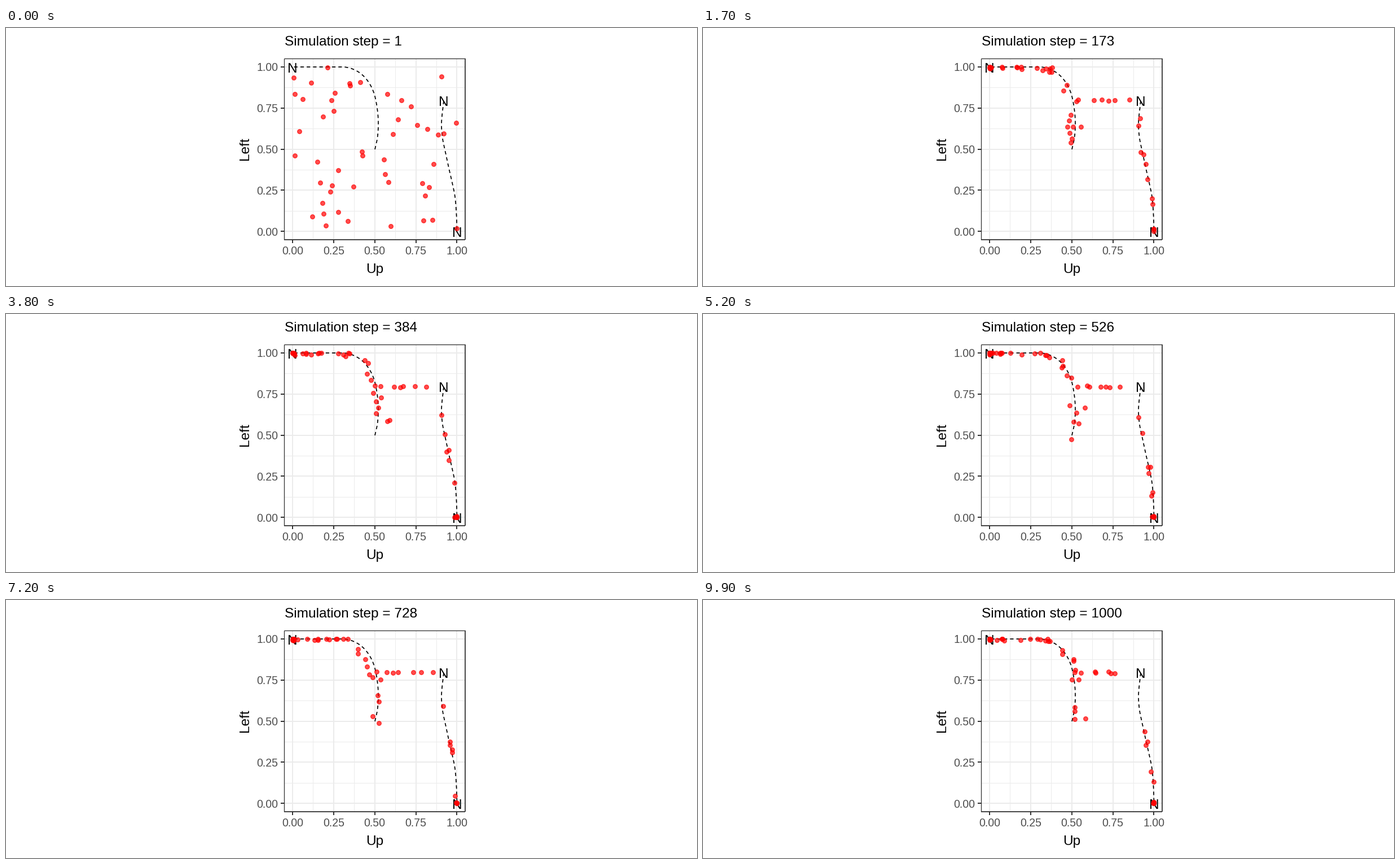
These frames come from a looping animation (1225 px wide and 457 px high, 10 s). A matplotlib script:

```python
import numpy as np
import matplotlib.pyplot as plt
from matplotlib.animation import FuncAnimation

W, H, DPI = 1225, 457, 64
FRAMES, INTERVAL = 100, 100
PT = 72 / DPI                      # points per pixel
X0, Y0, UNIT = 508, 360.3, 291.4   # plot origin and length of one unit
TEXT, LABEL = 24.4, 19.5

plt.rcParams["font.family"] = "Liberation Sans"

# Starting places of the dots, in pixels
START = np.array([
    (510, 88), (512, 117), (526, 126), (541, 97), (570, 70), (609, 98),
    (610, 102), (628, 96), (583, 115), (577, 128), (581, 147), (562, 157),
    (520, 183), (512, 226), (552, 237), (589, 252), (557, 274), (578, 279),
    (575, 290), (561, 310), (563, 329), (543, 334), (567, 350), (589, 326),
    (606, 342), (616, 281), (631, 219), (632, 226), (670, 233), (672, 259),
    (678, 273), (682, 351), (686, 188), (695, 162), (676, 117), (701, 128),
    (718, 139), (729, 172), (747, 179), (766, 189), (776, 187), (798, 168),
    (772, 86), (758, 241), (738, 275), (750, 282), (743, 297), (740, 341),
    (756, 340), (799, 355)], float)


def px(x):
    return X0 + UNIT * x


def py(y):
    return Y0 - UNIT * y


def smooth(points, n=30):
    """Catmull-Rom curve through the points."""
    p = np.array(points, float)
    p = np.vstack([2 * p[0] - p[1], p, 2 * p[-1] - p[-2]])
    t = np.linspace(0, 1, n, endpoint=False)[:, None]
    parts = []
    for a, b, c, d in zip(p, p[1:], p[2:], p[3:]):
        parts.append(b + t * (c - a) / 2 + t**2 * (a - 2.5 * b + 2 * c - d / 2)
                     + t**3 * (1.5 * (b - c) + (d - a) / 2))
    return np.vstack(parts + [p[-2:-1]])


def along(curve, u):
    """Place on the curve at share u of its length."""
    s = np.r_[0, np.cumsum(np.hypot(*np.diff(curve, axis=0).T))]
    s /= s[-1]
    return np.stack([np.interp(u, s, curve[:, i]) for i in (0, 1)], axis=-1)


arc = smooth([(654, 215), (658.5, 194), (660, 172), (659, 150), (655, 125),
              (649, 107), (640, 92), (628, 80), (613, 72), (600, 69)])
LEFT = np.vstack([arc, [(508, 69)]])
RIGHT = smooth([(776, 129), (773.5, 150), (772, 172), (774, 196), (779, 220),
                (785, 248), (791, 274), (796, 299), (798.5, 330), (799.5, 360)])
BRIDGE = np.array([(657, 128.5), (756, 128.5)])


def spread(dots, curve):
    """Even shares along the curve, in the order of the nearest points."""
    gap = np.hypot(*(dots[:, None] - curve[None]).transpose(2, 0, 1))
    order = np.argsort(np.argmin(gap, axis=1), kind="stable")
    u = np.empty(len(dots))
    u[order] = (np.arange(len(dots)) + 0.5) / len(dots)
    return u


def wander(rng, u, step=0.03):
    """Random walk folded back into 0..1."""
    moves = rng.normal(0, step, (FRAMES, len(u)))
    return np.abs((u + np.cumsum(moves, axis=0) + 1) % 2 - 1)


def jitter(rng, n, keep=0.7):
    """Correlated noise of unit spread, for x and y."""
    noise = rng.normal(size=(FRAMES, n, 2))
    for k in range(1, FRAMES):
        noise[k] = keep * noise[k - 1] + np.sqrt(1 - keep**2) * noise[k]
    return noise


def simulate():
    rng = np.random.default_rng(12)
    x, y = START.T
    right = (x > 737) & (y > 150)
    bridge = (x > 674) & (y < 200) & ~right
    left = ~(right | bridge)
    time = np.linspace(0, 1, FRAMES)[:, None]
    goal = np.empty((FRAMES, len(START), 2))

    u = np.minimum(1, 1.32 * wander(rng, spread(START[left], LEFT)))
    loose = (7.5 * (1 - u) + 2)[..., None] * [1, 0.8]
    goal[:, left] = along(LEFT, u) + loose * jitter(rng, left.sum())

    u = wander(rng, spread(START[bridge], BRIDGE), 0.05)
    goal[:, bridge] = along(BRIDGE, u) + jitter(rng, bridge.sum()) * [4, 0.9]

    u = 0.1 + 0.9 * wander(rng, spread(START[right], RIGHT))
    u = np.minimum(1, u * (1 + 0.75 * time))
    goal[:, right] = along(RIGHT, u) + 1.8 * jitter(rng, right.sum())

    goal[..., 0] = np.clip(goal[..., 0], px(0), px(1))
    goal[..., 1] = np.clip(goal[..., 1], py(1), py(0))
    pull = np.exp(-np.arange(FRAMES) / 3.5)[:, None, None]
    return goal + (START - goal) * pull


fig = plt.figure(figsize=(W / DPI, H / DPI), dpi=DPI, facecolor="white")
ax = fig.add_axes([0, 0, 1, 1])
ax.set(xlim=(0, W), ylim=(H, 0))
ax.axis("off")


def line(xs, ys, width, color, z, **kw):
    ax.plot(xs, ys, lw=width * PT, color=color, zorder=z,
            solid_capstyle="butt", dash_capstyle="butt", **kw)


def write(x, y, s, size=TEXT, color="black", **kw):
    kw = {"ha": "center", "va": "baseline", **kw}
    return ax.text(x, y, s, fontsize=size * PT, color=color, **kw)


lo, hi = -0.05, 1.05
sides = px(lo), px(hi)
ends = py(lo), py(hi)

for v in np.arange(9) / 8:
    major = v * 4 % 1 == 0
    width = 2 if major else 1
    line([px(v)] * 2, ends, width, "#EBEBEB", 1 + major)
    line(sides, [py(v)] * 2, width, "#EBEBEB", 1 + major)
    if major:
        line([px(v)] * 2, [ends[0], ends[0] + 6], 2, "#333333", 3)
        line([sides[0] - 6, sides[0]], [py(v)] * 2, 2, "#333333", 3)
        write(px(v), 401, f"{v:.2f}", LABEL, "#4D4D4D")
        write(482.5, py(v) + 7.5, f"{v:.2f}", LABEL, "#4D4D4D", ha="right")

line(sides, [ends[1]] * 2, 1.3, "#333333", 8)
line([sides[0]] * 2, ends, 1.3, "#333333", 8)
line(sides, [ends[0]] * 2, 1.8, "#333333", 8)
line([sides[1]] * 2, ends, 1.8, "#333333", 8)

for curve in (LEFT, RIGHT):
    line(*curve.T, 1.7, "black", 4, linestyle=(0, (3.6, 3)))
for x, y in ((508, 79), (776, 137.5), (799.5, 370)):
    write(x, y, "N", zorder=5)

write(654, 434, "Up")
write(430.5, 214, "Left", rotation=90, rotation_mode="anchor")
title = write(493.5, 31.5, "", ha="left")

paths = simulate()
red = (1, 0, 0, 0.7)
dots = ax.scatter(*START.T, s=(7.6 * PT) ** 2, facecolor=red, edgecolor=red,
                  linewidth=1.3 * PT, zorder=6)


def update(k):
    step = int(1 + 999 * k / (FRAMES - 1) + 0.5)
    title.set_text(f"Simulation step = {step}")
    dots.set_offsets(paths[k])
    return title, dots


anim = FuncAnimation(fig, update, frames=FRAMES, interval=INTERVAL,
                     init_func=lambda: update(0), repeat=True, repeat_delay=0)
plt.show()
```
